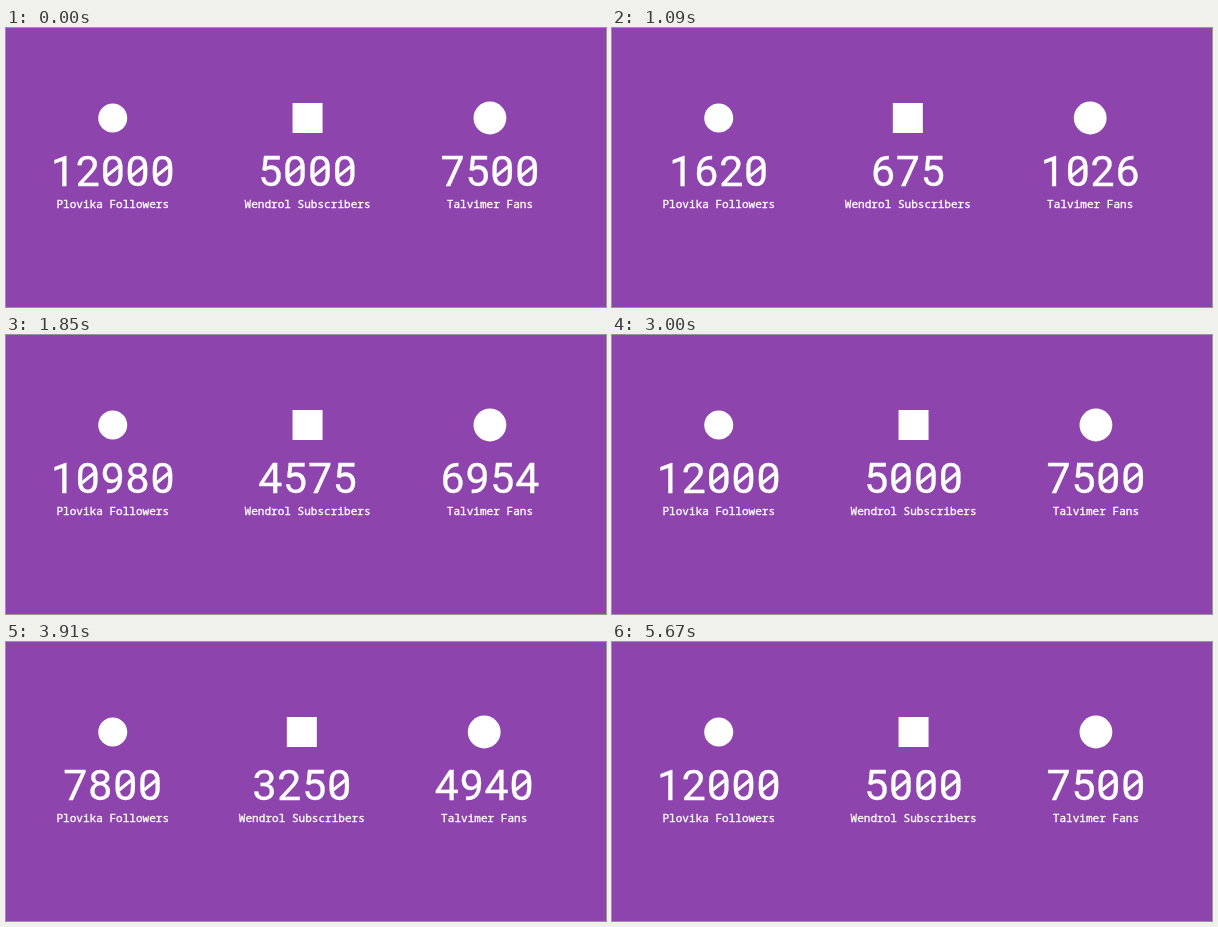
Animation, 600 px wide and 279 px high, one loop 5.7 s. Source, as an HTML page:

```html
<!DOCTYPE html>
<html lang="en">
<head>
<meta charset="utf-8">
<title>Counters</title>
<style>
html, body { margin: 0; width: 100%; height: 100%; overflow: hidden; background: #8e44ad; }
svg { display: block; fill: #fff; text-anchor: middle; }
text { stroke: #fff; stroke-width: .35; }
.num { font: 42.8px Roboto, sans-serif; }
.label { font: 11.05px "Noto Sans Mono", monospace; }
path { fill: none; stroke: #fff; stroke-width: 3.1; }
</style>
</head>
<body>
<svg width="600" height="279" viewBox="0 0 600 279"></svg>
<script>
const LOOP = 5700, FRAME = 30, STEPS = 200;
const CELL = 24.9, CHAR = 6.65, GAP = 69.4, MIDDLE = 289.1;

// Counter step over time; it restarts from zero twice per loop.
const KEYS = [
  [0, 200], [940, 200], [940, 0], [1090, 27], [1750, 167], [1840, 183], [1930, 200],
  [3280, 200], [3280, 0], [3550, 54], [4240, 200], [LOOP, 200]
];

const svg = document.querySelector('svg');
function add(parent, tag, attrs) {
  const el = document.createElementNS('http://www.w3.org/2000/svg', tag);
  for (const name in attrs) el.setAttribute(name, attrs[name]);
  return parent.appendChild(el);
}

function counter(target, label, iconTag, icon) {
  const group = add(svg, 'g', {});
  add(group, iconTag, icon);
  const num = add(group, 'text', { class: 'num', y: 158.3 });
  const slashes = add(group, 'path', {});
  add(group, 'text', { class: 'label', y: 180.3 }).textContent = label;
  return { target, label, group, num, slashes };
}

const counters = [
  counter(12000, 'Plovika Followers', 'circle', { cy: 90, r: 14.5 }),
  counter(5000, 'Wendrol Subscribers', 'rect', { x: -15, y: 75, width: 30, height: 30 }),
  counter(7500, 'Talvimer Fans', 'circle', { cy: 90, r: 16.4 })
];

function stepAt(t) {
  const i = KEYS.findIndex(key => key[0] > t);
  const [t0, a] = KEYS[i - 1], [t1, b] = KEYS[i];
  return Math.round(a + (b - a) * (t - t0) / (t1 - t0));
}

function draw(t) {
  const frame = Math.max(0, Math.floor((t - 10) / FRAME) * FRAME + 10);
  const step = stepAt(frame);
  for (const c of counters) {
    c.text = String(Math.min(c.target, step * Math.ceil(c.target / STEPS)));
    c.width = Math.max(c.text.length * CELL, c.label.length * CHAR);
  }

  // Centred row: each column is as wide as its number or label.
  let left = MIDDLE - GAP - counters.reduce((sum, c) => sum + c.width, 0) / 2;
  for (const c of counters) {
    c.group.setAttribute('transform', `translate(${left + c.width / 2} 0)`);
    left += c.width + GAP;
    const digits = [...c.text];
    const xs = digits.map((_, i) => (i - (digits.length - 1) / 2) * CELL);
    c.num.setAttribute('x', xs.join(' '));
    c.num.textContent = c.text;
    const zeros = xs.filter((_, i) => digits[i] === '0');
    c.slashes.setAttribute('d', zeros.map(x => `M${x - 6} 148l12 -9.8`).join(''));
  }
}

const start = performance.now();
function tick() {
  draw((performance.now() - start) % LOOP);
  requestAnimationFrame(tick);
}
tick();
</script>
</body>
</html>
```
